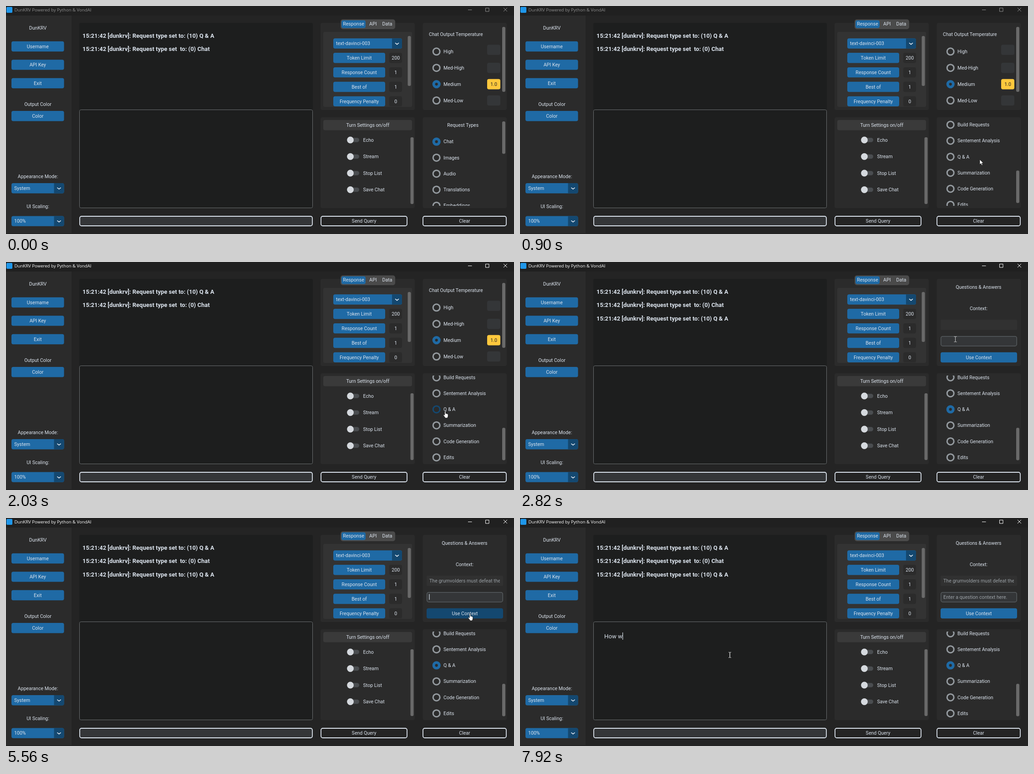
Write an HTML page that moves like this. It is 1116x502 px and loops after 7990 ms.

```html
<!DOCTYPE html>
<html lang="en">
<head>
<meta charset="utf-8">
<title>Chat client</title>
<style>
html, body { margin: 0; width: 100%; height: 100%; overflow: hidden; background: #242424; }
svg { display: block; width: 1116px; height: 502px; }
text { font-family: Roboto, Arial, sans-serif; white-space: pre; }
</style>
</head>
<body>
<svg id="stage" viewBox="0 0 1116 502" xmlns="http://www.w3.org/2000/svg"></svg>
<script>
const LOOP = 7990;
const C = {
  blue: '#1f6aa5', deep: '#144870', text: '#dce4ee', panel: '#2b2b2b', inner: '#333333',
  field: '#343638', edge: '#565b5e', ring: '#949a9f', bar: '#696969', box: '#1d1e1e'
};
const CONTEXT = 'The grumvolders must defeat the Tarholds.';
const SCROLL_MAX = 291.5;

// Markup helpers; text y is the middle of the capitals
const rect = (x, y, w, h, fill, r = 4, extra = '') =>
  `<rect x="${x}" y="${y}" width="${w}" height="${h}" rx="${r}" fill="${fill}" ${extra}/>`;
const label = (x, y, s, o = {}) => {
  const size = o.size || 10.6;
  return `<text x="${x}" y="${y + size * 0.355}" font-size="${size}" fill="${o.fill || C.text}"` +
    ` text-anchor="${o.at || 'start'}" ${o.extra || ''}>${s.replace(/&/g, '&amp;')}</text>`;
};
const mid = (x, y, s, o = {}) => label(x, y, s, { ...o, at: 'middle' });
const button = (x, y, w, s, id = '') =>
  rect(x, y - 11.2, w, 22.4, C.blue, 4, id && `id="${id}"`) + mid(x + w / 2, y, s);
const outlined = (x, w, s, fill = 'none') =>
  rect(x + 1, 463, w - 2, 21, fill, 4, `stroke="${C.text}" stroke-width="1.8"`) + mid(x + w / 2, 473.2, s);
const menu = (x, y, w, s) =>
  rect(x, y - 11.2, w, 22.4, C.blue) +
  `<path d="M${x + w - 22} ${y - 11.2}h18q4 0 4 4v14.4q0 4-4 4h-18z" fill="${C.deep}"/>` +
  `<path d="M${x + w - 14.5} ${y - 0.8}l3.5 2.8l3.5-2.8" fill="none" stroke="${C.text}" stroke-width="1.7" stroke-linecap="round" stroke-linejoin="round"/>` +
  label(x + 6, y, s);
const bar = (x, y, h, id = '') => rect(x, y, 7, h, C.bar, 3, id && `id="${id}"`);
const ring = (y, on, id = '') =>
  `<circle cx="945.7" cy="${y}" r="${on ? 6.1 : 7.5}" fill="none" stroke="${on ? C.blue : C.ring}"` +
  ` stroke-width="${on ? 6 : 3.1}" ${id && `id="${id}"`}/>`;
const radio = (y, s, on, id) => ring(y, on, id) + label(961, y, s);
const toggle = (y, s) =>
  rect(752, y - 4.8, 24, 9.6, '#4a4d50', 4.8) +
  `<circle cx="756.5" cy="${y}" r="7.4" fill="#d5d9de"/>` + label(784.5, y, s);
const log = (y, s, extra = '') =>
  label(168, y, s, { size: 13, extra: 'font-weight="700" ' + extra });
const caret = (id, y, h) => rect(0, y, 1.2, h, C.text, 0, `id="${id}"`);

const requests = ['Chat', 'Images', 'Audio', 'Translations', 'Embeddings', 'Files', 'Moderations',
  'Build Requests', 'Sentement Analysis', 'Q & A', 'Summarization', 'Code Generation', 'Edits'];

const titleBar =
  rect(0, 0, 1116, 21, '#202020', 0) + rect(1, 2, 13, 13, '#1f97ea', 2) +
  `<g id="title">` +
  label(18.5, 8.3, 'DunKRV Powered by Python & VondAI',
    { size: 9.6, fill: 'currentColor', extra: 'style="font-family:\'Open Sans\',sans-serif"' }) +
  `<path d="M1015 8.5h8.5M1053.5 4.5h7.5v7.5h-7.5zM1093 4l8 8m0-8l-8 8" fill="none" stroke="currentColor"/></g>`;

const sidebar =
  rect(0, 21, 144, 479, C.panel, 0) + mid(70, 48.5, 'DunKRV') +
  button(12, 89, 115.5, 'Username') + button(12, 129.4, 115.5, 'API Key') +
  button(12, 170, 115.5, 'Exit') + mid(70, 216, 'Output Color') +
  button(12, 242.3, 115.5, 'Color') + mid(70, 374.8, 'Appearance Mode:') +
  menu(12, 401.2, 115.5, 'System') + mid(70, 441.7, 'UI Scaling:') +
  menu(12, 473.6, 115.5, '100%');

const middle =
  rect(161, 37, 513, 196, C.box) +
  rect(161.5, 228.5, 512, 216, C.box, 3, 'stroke="#6b6f71"') +
  log(65.5, '15:21:42 [dunkrv]: Request type set to: (10) Q & A') +
  log(94.8, '15:21:42 [dunkrv]: Request type set  to: (0) Chat') +
  log(124.2, '15:21:42 [dunkrv]: Request type set to: (10) Q & A', 'id="newLog"') +
  label(185, 260.3, '', { size: 13.2, extra: 'id="prompt"' }) + caret('promptCaret', 252, 16) +
  outlined(161, 513, '', C.field);

const settings =
  rect(691, 37, 207, 192, C.panel) + rect(697, 57, 195, 165, C.inner, 3) +
  rect(735, 29.5, 120, 21.5, '#4a4a4a', 5) + rect(737, 31.5, 53, 17, C.blue) +
  mid(763.5, 39.7, 'Response') + mid(806.3, 39.7, 'API') + mid(837.5, 39.7, 'Data') +
  menu(719, 82.5, 151, 'text-davinci-003') +
  [['Token Limit', '200'], ['Response Count', '1'], ['Best of', '1'], ['Frequency Penalty', '0']]
    .map(([name, value], i) => {
      const y = 114.2 + i * 31.9;
      return button(719, y, 114, name) + rect(842, y - 11.2, 28, 22.4, C.panel) + mid(856.3, y, value);
    }).join('') +
  bar(882.5, 66, 110) +
  rect(691, 245, 207, 200, C.panel) + rect(697, 251, 195, 22.5, '#3a3a3a') +
  mid(794.8, 262.4, 'Turn Settings on/off') +
  ['Echo', 'Stream', 'Stop List', 'Save Chat'].map((s, i) => toggle(295 + i * 36.5, s)).join('') +
  bar(888.5, 289, 147) + outlined(691, 191, 'Send Query');

const temperature =
  `<g id="temperature">` + label(929, 62.5, 'Chat Output Temperature') +
  ['High', 'Med-High', 'Medium', 'Med-Low'].map((s, i) => {
    const y = 100.3 + i * 35.9, on = i === 2;
    return radio(y, s, on) +
      rect(1057, (i ? y : 96.5) - 11.3, 29, 22.6, on ? '#ffc83d' : C.field) +
      (on ? mid(1071.5, y, '1.0', { fill: '#242424' }) : '');
  }).join('') + bar(1090, 46, 143) + `</g>`;

const questions =
  `<g id="questions">` + mid(1007.3, 54.8, 'Questions & Answers') + mid(1007.5, 102.5, 'Context:') +
  rect(924, 126.7, 168, 23, '#313131', 3) +
  `<g clip-path="url(#fieldClip)">` + label(930, 138, CONTEXT, { fill: '#9aa0a5', extra: 'id="saved"' }) + `</g>` +
  rect(924.7, 163.7, 166.6, 21.2, C.field, 4, `stroke="${C.edge}" stroke-width="1.5"`) +
  `<g clip-path="url(#fieldClip)">` +
  label(1083, 174, CONTEXT, { at: 'end', extra: 'id="typed"' }) +
  label(930, 174, 'Enter a question context here.', { fill: '#9ea4a9', extra: 'id="hint"' }) + `</g>` +
  caret('entryCaret', 167.5, 12.5) + button(924, 210, 168, 'Use Context', 'use') + `</g>`;

const types =
  rect(915.5, 245, 184.5, 200, C.panel) +
  `<g clip-path="url(#listClip)"><g id="list">` + mid(1003.7, 262, 'Request Types') +
  requests.map((s, i) => radio(298.7 + i * 35.25, s, false, 'type' + i)).join('') + `</g></g>` +
  bar(1090, 254, 71.5, 'thumb') + outlined(915, 185, 'Clear');

const pointers =
  `<g id="arrow"><path d="M0 0v11l2.6-2.3l1.8 4l1.9-.9l-1.8-3.8h3.5z" fill="#fff" stroke="#111" stroke-width=".7"/></g>` +
  `<g id="hand"><path d="M-1.2 9V1.2q0-1.2 1.1-1.2t1.1 1.2v4q1.2-.6 1.8.4q1.3-.5 1.7.5q1.6-.3 1.6 1.3v3.2q0 1.8-1.2 3.4v1h-5.2v-1L-3.7 9.4q-.6-1.1.4-1.7q.8-.4 2.1 1.3z" fill="#fff" stroke="#111" stroke-width=".7"/></g>` +
  `<g id="beam"><path d="M-3-5.8h2.2q.8 0 .8.8v10q0 .8-.8.8H-3M3-5.8H.8Q0-5.8 0-5v10q0 .8.8.8H3" fill="none" stroke="#d0d0d0"/></g>`;

const stage = document.getElementById('stage');
stage.innerHTML =
  `<defs><clipPath id="fieldClip"><rect x="929.5" y="120" width="155.5" height="70"/></clipPath>` +
  `<clipPath id="listClip"><rect x="916" y="250" width="172" height="190"/></clipPath></defs>` +
  titleBar + sidebar + middle + settings + rect(915.5, 37, 184.5, 192, C.panel) +
  temperature + questions + types + pointers;

const el = {};
stage.querySelectorAll('[id]').forEach(n => { el[n.id] = n; });

// Stepped timelines: [start ms, value...]
const pointer = [
  [0, ''], [230, 'arrow', 1021, 387], [300, 'arrow', 1015, 361], [370, 'arrow', 1010, 338],
  [1300, 'arrow', 1005, 337], [1360, 'arrow', 991, 334], [1430, 'hand', 974, 328.5],
  [1490, 'hand', 971, 328.5], [1560, 'hand', 968, 328.5], [1690, 'hand', 965, 328.5],
  [2560, 'hand', 964, 318], [2630, 'arrow', 961, 285], [2690, 'arrow', 958, 236],
  [2760, 'beam', 956, 182], [2820, 'beam', 956.5, 170], [2890, 'beam', 960, 168],
  [2960, 'beam', 964, 167], [3030, 'beam', 967, 167], [3300, 'beam', 969, 168.5],
  [4560, 'beam', 978, 175], [4630, 'arrow', 996, 189], [4690, 'hand', 1010, 203],
  [4760, 'hand', 1017, 209], [4820, 'hand', 1019.5, 211],
  [5890, 'arrow', 985, 228], [5960, 'arrow', 880, 262], [6030, 'arrow', 740, 287],
  [6100, 'beam', 600, 299], [6170, 'beam', 500, 301], [6240, 'beam', 461, 301.5]
];
const entryCarets = [[0, 0], [3030, 930], [3760, 1083], [4360, 0], [4690, 1083], [5220, 0], [5560, 930], [6160, 0]];
const prompts = [[0, ''], [7120, 'H'], [7320, 'Ho'], [7450, 'How'], [7650, 'How '], [7920, 'How w']];

const at = (steps, t) => steps.findLast(s => s[0] <= t);
const within = (t, a, b = LOOP) => t >= a && t < b;
const show = (node, on) => node.setAttribute('visibility', on ? 'visible' : 'hidden');
const set = (node, attrs) => { for (const k in attrs) node.setAttribute(k, attrs[k]); };

function drawRing(node, state) {
  const on = state === 'on';
  set(node, {
    r: on ? 6.1 : 7.5, 'stroke-width': on ? 6 : 3.1,
    stroke: on ? C.blue : state === 'hover' ? C.deep : C.ring
  });
}

function render(t) {
  el.title.style.color = t < 1970 ? '#8f8f8f' : '#ffffff';

  const notches = [630, 700, 770, 830, 900, 970].filter(s => s <= t).length;
  const scroll = Math.min(SCROLL_MAX, notches * 56.8);
  set(el.list, { transform: `translate(0 ${-scroll})` });
  set(el.thumb, { y: 254 + 111 * scroll / SCROLL_MAX });

  const answered = t >= 2100;
  drawRing(el.type0, answered ? '' : 'on');
  drawRing(el.type9, answered ? 'on' : t >= 1430 ? 'hover' : '');
  show(el.newLog, answered);
  el.temperature.style.display = answered ? 'none' : '';
  el.questions.style.display = answered ? '' : 'none';

  show(el.typed, within(t, 3760, 5220));
  show(el.saved, t >= 5220);
  show(el.hint, t >= 6460);
  const hover = within(t, 4690, 5220) || within(t, 5350, 5890);
  set(el.use, { fill: hover ? C.deep : C.blue });
  const x = at(entryCarets, t)[1];
  show(el.entryCaret, x > 0);
  set(el.entryCaret, { x: x - 0.6 });

  el.prompt.textContent = at(prompts, t)[1];
  show(el.promptCaret, within(t, 6520, 7120) || t >= 7320);
  set(el.promptCaret, { x: 185 + el.prompt.getComputedTextLength() });

  const [, shape, px, py] = at(pointer, t);
  for (const name of ['arrow', 'hand', 'beam']) {
    show(el[name], name === shape);
    if (name === shape) set(el[name], { transform: `translate(${px} ${py})` });
  }
}

const start = performance.now();
function tick() {
  render((performance.now() - start) % LOOP);
  requestAnimationFrame(tick);
}
tick();
</script>
</body>
</html>
```
